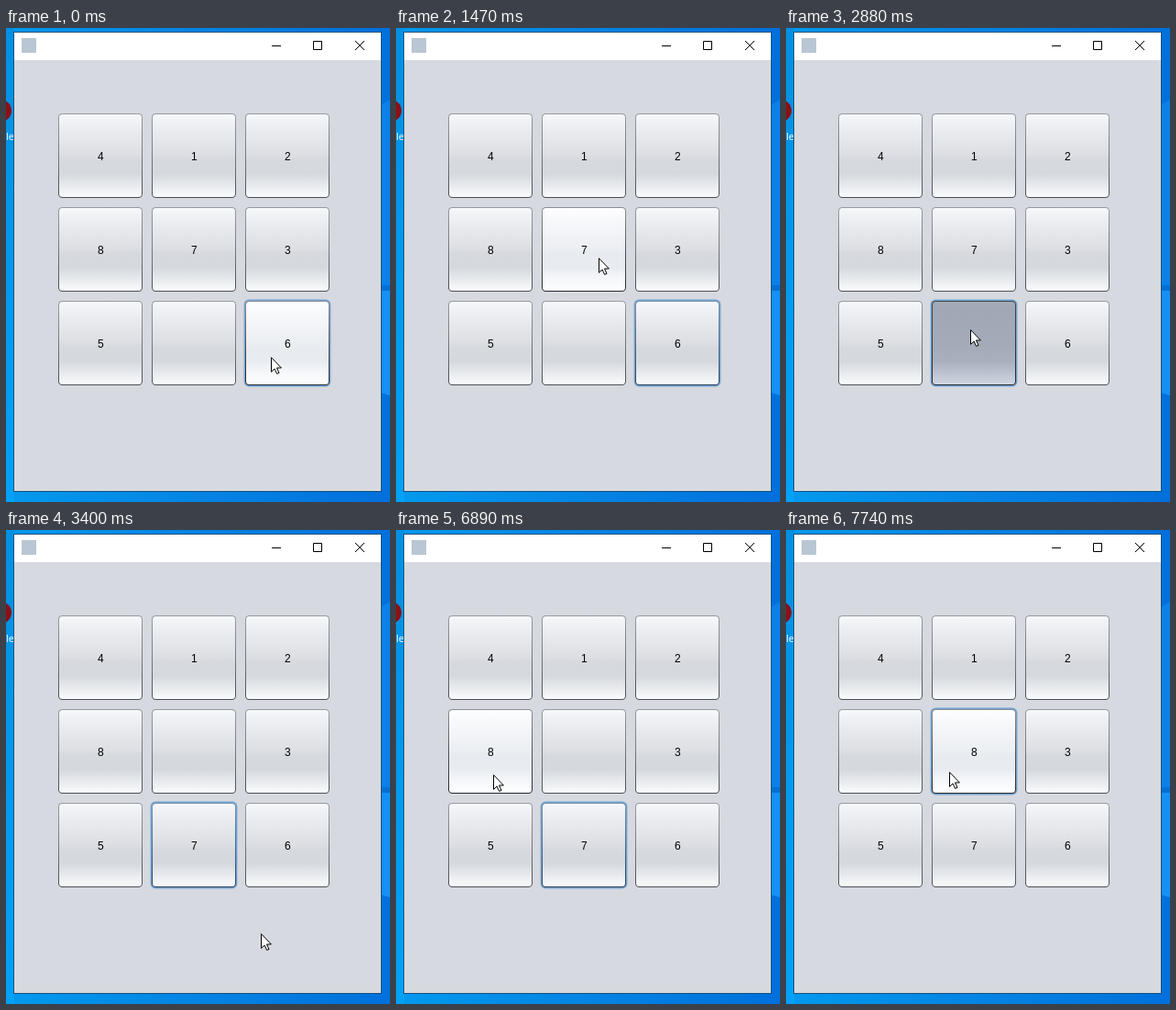
Recreate the animation shown at these times as an HTML page. Size 419 by 516 pixels, loop 8 s.

```html
<!DOCTYPE html>
<html lang="en">
<head>
<meta charset="utf-8">
<title>Sliding puzzle</title>
<style>
  html, body { margin: 0; width: 100%; height: 100%; overflow: hidden; background: #0078d7; }
  svg { display: block; width: 419px; height: 516px; }
  .digit { font: 12px "Liberation Sans", Arial, sans-serif; fill: #000; }
  .label { font: 11px "Open Sans", sans-serif; fill: #fff; }
</style>
</head>
<body>
<svg id="stage" viewBox="0 0 419 516" xmlns="http://www.w3.org/2000/svg">
  <defs id="defs">
    <linearGradient id="sky">
      <stop offset="0" stop-color="#0399ee"/>
      <stop offset=".5" stop-color="#0584e4"/>
      <stop offset="1" stop-color="#0070dc"/>
    </linearGradient>
    <linearGradient id="leftSky" x2="0" y2="1">
      <stop offset="0" stop-color="#0490e2"/>
      <stop offset=".5" stop-color="#0299ec"/>
      <stop offset="1" stop-color="#02a2f8"/>
    </linearGradient>
  </defs>

  <rect width="419" height="516" fill="url(#sky)"/>
  <rect width="9" height="516" fill="url(#leftSky)"/>
  <path d="M409 84L419 78V280H409Z" fill="#0a80e8"/>
  <path d="M409 286H419V400L409 397Z" fill="#1590f4"/>
  <path d="M409 281H419V286H409Z" fill="#0670d2"/>
  <circle cx="-6" cy="90" r="12" fill="#8c1014"/>
  <text class="label" x="0" y="122">le_</text>

  <rect x="8" y="4" width="402" height="501" fill="#17507c"/>
  <rect x="9" y="5" width="400" height="30" fill="#fff"/>
  <rect x="9" y="35" width="400" height="469" fill="#d6d9df"/>
  <rect x="17" y="11" width="16" height="16" fill="#b9c6d3"/>
  <g fill="none" stroke="#000">
    <path d="M290 19.5H300M335.5 14.5H344.5V23.5H335.5Z"/>
    <path d="M381 14L391 24M391 14L381 24"/>
  </g>

  <g id="board"></g>
  <path id="cursor" d="M.5 .7V16.4L4.1 13L6.6 18.4L9 17.4L6.5 12H11.4Z" fill="#fff" stroke="#000"/>
</svg>
<script>
const LOOP = 8000;
const SIZE = 92, PITCH = 102, LEFT = 57, TOP = 93;

// Vertical gradients per button look: "offset colour" pairs.
const gradients = {
  normal: "0 #f7f8fa,.1 #f0f1f4,.3 #e5e7eb,.5 #dcdee3,.55 #d6d9de,.72 #d5d9de,.82 #e2e5e9,1 #fafbfc",
  hover: "0 #fefeff,.1 #f9fafc,.3 #f2f4f7,.5 #ebeef2,.55 #e8ecf1,.72 #e8ecf1,.84 #f4f6f9,1 #ffffff",
  press: "0 #a4abb7,.1 #a0a8b5,.5 #a3abb9,.72 #a8b0be,1 #d0d6e0",
  normalEdge: "0 #969aa2,.5 #74787f,1 #4b4e55",
  hoverEdge: "0 #8b8f98,.5 #50545c,1 #25282f",
  pressEdge: "0 #42464e,.5 #33373f,1 #25282f",
  focusEdge: "0 #7c93ad,.5 #4f6a88,1 #2c4058"
};

// Changes to the state over time; anything left out keeps its value.
const steps = [
  [0, { x: 289, y: 358, hover: 8, focus: 8, press: -1, tiles: "4128735 6" }],
  [870, { x: 266, y: 350 }],
  [1020, { x: 264 }],
  [1170, { x: 240, y: 322, hover: 7 }],
  [1320, { x: 242, y: 278, hover: 4 }],
  [1470, { x: 221, y: 250 }],
  [1930, { press: 4, focus: 4 }],
  [2080, { x: 217, y: 262, press: -1 }],
  [2210, { x: 205, y: 317, hover: 7 }],
  [2360, { x: 201, y: 328 }],
  [2880, { press: 7, focus: 7 }],
  [3000, { press: -1, tiles: "4128 3576" }],
  [3260, { y: 334 }],
  [3400, { x: 278, y: 439, hover: -1 }],
  [6140, { x: 270, y: 373, hover: 8 }],
  [6290, { x: 177, y: 289, hover: -1 }],
  [6440, { x: 138, y: 301 }],
  [6590, { x: 118, y: 303, hover: 6 }],
  [6740, { x: 108, y: 267, hover: 3 }],
  [6890, { x: 106, y: 266 }],
  [7020, { press: 3, focus: 3 }],
  [7170, { x: 116, y: 265, press: -1 }],
  [7290, { x: 170, y: 263, hover: 4 }],
  [7440, { x: 174 }],
  [7590, { x: 178, press: 4, focus: 4 }],
  [7740, { press: -1, tiles: "412 83576" }]
];

function add(parent, tag, attrs) {
  const el = document.createElementNS("http://www.w3.org/2000/svg", tag);
  for (const key in attrs) el.setAttribute(key, attrs[key]);
  return parent.appendChild(el);
}

const byId = id => document.getElementById(id);

for (const id in gradients) {
  const gradient = add(byId("defs"), "linearGradient", { id, x2: 0, y2: 1 });
  for (const stop of gradients[id].split(",")) {
    const [offset, color] = stop.split(" ");
    add(gradient, "stop", { offset, "stop-color": color });
  }
}

function box(parent, grow, radius, fill) {
  const side = SIZE + 2 * grow;
  return add(parent, "rect", { x: -grow, y: -grow, width: side, height: side, rx: radius, fill });
}

const buttons = Array.from({ length: 9 }, (_, i) => {
  const x = LEFT + i % 3 * PITCH, y = TOP + Math.floor(i / 3) * PITCH;
  const group = add(byId("board"), "g", { transform: `translate(${x} ${y})` });
  return {
    ring: box(group, 1.4, 5.4, "#73a4d1"),
    edge: box(group, 0, 4.5),
    face: box(group, -1, 3.5),
    text: add(group, "text", { x: 43, y: 51, class: "digit" })
  };
});

function stateAt(time) {
  const state = {};
  for (const [start, change] of steps) {
    if (start > time) break;
    Object.assign(state, change);
  }
  return state;
}

function draw(time) {
  const { x, y, hover, focus, press, tiles } = stateAt(time);
  buttons.forEach((button, i) => {
    const look = i === press ? "press" : i === hover ? "hover" : "normal";
    const focused = i === focus;
    const edge = focused && look === "normal" ? "focus" : look;
    button.ring.setAttribute("visibility", focused ? "visible" : "hidden");
    button.edge.setAttribute("fill", `url(#${edge}Edge)`);
    button.face.setAttribute("fill", `url(#${look})`);
    button.text.textContent = tiles[i].trim();
  });
  byId("cursor").setAttribute("transform", `translate(${x} ${y})`);
}

const begin = performance.now();
function tick() {
  draw((performance.now() - begin) % LOOP);
  requestAnimationFrame(tick);
}
tick();
</script>
</body>
</html>
```
